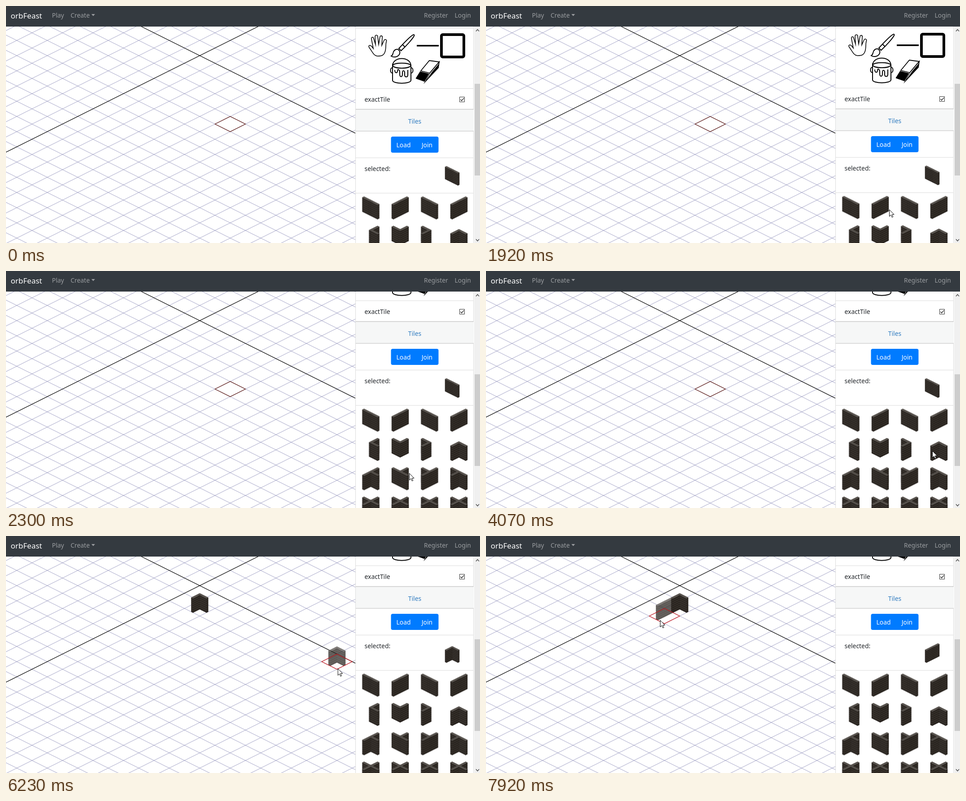
Write an HTML page with a canvas that moves like this. It is 1057 px wide and 530 px high and loops after 8000 ms.

```html
<!DOCTYPE html>
<html lang="en">
<head>
<meta charset="utf-8">
<title>Isometric tile editor</title>
<style>
html, body { margin: 0; width: 100%; height: 100%; overflow: hidden; background: #fff; }
canvas { display: block; }
</style>
</head>
<body>
<canvas id="stage" width="1057" height="530"></canvas>
<script>
const ctx = document.getElementById('stage').getContext('2d');
const LOOP = 8000, STEP = 76.8;
const OX = 432, OY = 111, HW = 34, HH = 17;   // grid origin and half cell

// ---- wall sprites, built from isometric boxes ----
const BOXES = {
  nw: [-17, -2, -2, 2], ne: [-2, 2, -17, -2], mid: [-2, 2, -2, 2],
  se: [2, 17, -2, 2], sw: [-2, 2, 2, 17]
};
const WALL = 32, LOGS = 7;

function makeWall(arms) {
  const cv = document.createElement('canvas');
  cv.width = 42;
  cv.height = 56;
  const g = cv.getContext('2d');
  g.translate(21, 44);
  const pt = (u, v, h) => [u - v, (u + v) / 2 - h];
  const poly = (color, pts) => {
    g.beginPath();
    pts.forEach(p => g.lineTo(...p));
    g.closePath();
    g.fillStyle = g.strokeStyle = color;
    g.lineWidth = 0.4;
    g.fill();
    g.stroke();
  };
  const face = (a, b, color, groove) => {
    poly(color, [pt(...a, 0), pt(...b, 0), pt(...b, WALL), pt(...a, WALL)]);
    g.strokeStyle = groove;
    g.lineWidth = 0.8;
    for (let k = 1; k < LOGS; k++) {
      g.beginPath();
      g.moveTo(...pt(...a, k * WALL / LOGS));
      g.lineTo(...pt(...b, k * WALL / LOGS));
      g.stroke();
    }
  };
  for (const name of ['nw', 'ne', 'mid', 'se', 'sw']) {
    if (name !== 'mid' && !arms.includes(name)) continue;
    const [u0, u1, v0, v1] = BOXES[name];
    face([u0, v1], [u1, v1], '#2d2824', '#4a443e');
    face([u1, v0], [u1, v1], '#29241f', '#47403a');
    poly('#56514c', [pt(u0, v0, WALL), pt(u1, v0, WALL), pt(u1, v1, WALL), pt(u0, v1, WALL)]);
  }
  return cv;
}

const back = makeWall('nw se'), slash = makeWall('ne sw'), roof = makeWall('sw se');
const cross = makeWall('nw ne sw se');
const palette = [
  back, slash, back, slash,
  makeWall('ne se'), makeWall('nw ne'), makeWall('nw sw'), roof,
  makeWall('sw se ne'), makeWall('nw se ne'), makeWall('ne sw nw'), makeWall('nw se sw'),
  cross, cross, cross, cross
];

function putWall(wall, x, y, scale = 1) {
  ctx.drawImage(wall, x - 21 * scale, y - 44 * scale, 42 * scale, 56 * scale);
}

// ---- drawing helpers ----
function rect(x, y, w, h, color) {
  ctx.fillStyle = color;
  ctx.fillRect(x, y, w, h);
}

function text(str, x, y, color, size = 13.9, align = 'left') {
  ctx.font = size + 'px "Noto Sans", "Open Sans", sans-serif';
  ctx.textAlign = align;
  ctx.fillStyle = color;
  ctx.fillText(str, x, y);
}

function shape(d, stroke, width, fill) {
  const p = new Path2D(d);
  if (fill) { ctx.fillStyle = fill; ctx.fill(p); }
  if (stroke) { ctx.strokeStyle = stroke; ctx.lineWidth = width; ctx.stroke(p); }
}

function clipTo(x, y, w, h, draw) {
  ctx.save();
  ctx.beginPath();
  ctx.rect(x, y, w, h);
  ctx.clip();
  draw();
  ctx.restore();
}

// ---- pointer path: time, x, y ----
const PATH = [
  [0, 952, 536], [80, 946, 518], [400, 905, 458], [600, 880, 434], [830, 866, 441],
  [1140, 825, 442], [1229, 825, 442], [1370, 889, 439], [1460, 889, 439],
  [1750, 899, 455], [1920, 899, 455], [2304, 899, 452], [2610, 898, 447],
  [2842, 898, 447], [3072, 800, 391], [3230, 897, 447], [3456, 897, 447],
  [4070, 995, 402], [4531, 995, 402], [5299, 442, 172], [5376, 442, 172],
  [5450, 438, 164], [5914, 438, 164], [6390, 906, 369], [6460, 906, 369],
  [6770, 872, 341], [6912, 872, 341], [7219, 764, 329], [7680, 366, 196],
  [7775, 366, 196], [7910, 388, 188], [8000, 388, 188]
];

function pointer(t) {
  const n = Math.max(1, PATH.findIndex(k => k[0] >= t));
  const [t0, x0, y0] = PATH[n - 1], [t1, x1, y1] = PATH[n];
  const p = (t - t0) / (t1 - t0);
  return [x0 + (x1 - x0) * p, y0 + (y1 - y0) * p];
}

const onMap = ([x, y]) => x < 779 && y > 46;

// Centre of the last cell the pointer touched
function hoverCell(t) {
  for (let q = t; q >= 0; q -= STEP) {
    const p = pointer(q);
    if (!onMap(p)) continue;
    const a = (p[0] - OX) / HW, b = (p[1] - OY) / HH;
    const i = Math.floor((a + b) / 2), j = Math.floor((b - a) / 2);
    return [OX + (i - j) * HW, OY + (i + j + 1) * HH];
  }
  return [500, 264];
}

// ---- scene parts ----
function gridLine(n, color, width) {
  ctx.strokeStyle = color;
  ctx.lineWidth = width;
  for (const slope of [0.5, -0.5]) {
    ctx.beginPath();
    ctx.moveTo(0, OY + n * HH * 2 - OX * slope);
    ctx.lineTo(779, OY + n * HH * 2 + (779 - OX) * slope);
    ctx.stroke();
  }
}

function drawMap(t, selected) {
  for (let n = -10; n < 22; n++) if (n) gridLine(n, '#a3a3c6', 1);
  gridLine(0, '#000', 1.2);
  if (t >= 5750) putWall(roof, 432, 162);
  const [x, y] = hoverCell(t), live = onMap(pointer(t));
  if (live) {
    ctx.globalAlpha = 0.75;
    putWall(selected, x, y);
    ctx.globalAlpha = 1;
  }
  shape(`M${x - HW} ${y}L${x} ${y - HH}L${x + HW} ${y}L${x} ${y + HH}Z`, live ? '#c4161c' : '#5e1a14', 1.2);
}

function drawTools() {
  const ink = '#000';
  // hand
  shape('M828 112C820 111 818 104 810 93C807 88 812 86 816 91L819 95L815 74C814 69 819 68 820 73L824 86L823 69C823 64 829 64 829 69L831 86L834 69C835 65 840 66 839 71L838 88L843 77C845 73 850 75 848 80C846 88 848 95 845 103C842 111 837 112 828 112Z', ink, 1.6);
  // brush
  shape('M909 64C904 65 888 82 876 95L881 100C893 89 907 73 910 67C911 65 910 64 909 64ZM884 86L890 92M874 97C868 96 864 100 863 106C862 110 861 111 859 112C865 116 876 114 878 106C879 103 878 100 874 97Z', ink, 2);
  rect(916, 87, 49, 3.5, ink);
  ctx.strokeStyle = ink;
  ctx.lineWidth = 6;
  ctx.beginPath();
  ctx.roundRect(971, 64, 50, 50, 3);
  ctx.stroke();
  // bucket
  shape('M862 134C862 112 903 112 903 134M862 133C866 126 899 126 903 133C899 141 866 141 862 133V166C862 175 903 175 903 166V133M862 138C856 138 856 150 862 150M903 138C909 138 909 150 903 150M867 143c0 8 6 8 6 2s5-2 5 3v4c0 8 6 8 6 0v-3c0-6 5-5 5 0v5c0 6 7 6 7 0v-11', ink, 2);
  // eraser
  shape('M925 145L944 122L966 125L945 150Z', ink, 1.8, '#fff');
  shape('M945 150L966 125L964 138L935 169Z', ink, 1.8, '#fff');
  shape('M924 146L944 151L934 169L914 162ZM950 148L965 130L964 138L941 162Z', ink, 1, ink);
  shape('M924 146L944 151L934 169', '#fff', 0.8);
}

function drawPanel(scroll, selected) {
  const rule = (y, h = 1, color = '#dcdcdc') => rect(780, y, 263, h, color);
  rect(779, 46, 278, 484, '#fff');
  rect(779, 46, 1, 484, '#dcdcdc');
  rect(1042, 46, 1, 484, '#dcdcdc');
  ctx.save();
  ctx.translate(0, -scroll);
  rule(49);
  drawTools();
  rule(184);
  text('exactTile', 799.5, 214, '#212529');
  shape('M1011.5 203.5h11v11h-11Z', '#333', 1);
  shape('M1013.5 209l2.5 3l5-6', '#222', 1.3);
  rule(230, 2, '#d6d6d6');
  rule(232, 47, '#f6f7f7');
  rule(279, 1.5, '#d2d2d2');
  text('Tiles', 911.5, 263, '#2f7bc0', 13.9, 'center');
  ctx.fillStyle = '#007bff';
  ctx.beginPath();
  ctx.roundRect(858.5, 292, 106, 36, 4);
  ctx.fill();
  text('Load', 886.5, 316, '#fff', 13.9, 'center');
  text('Join', 939, 316, '#fff', 13.9, 'center');
  rule(339);
  text('selected:', 799.5, 369, '#212529');
  putWall(selected, 995, 393.3, 0.85);
  rule(418);
  palette.forEach((wall, n) => putWall(wall, 813.5 + n % 4 * 65.5, 467.5 + (n >> 2) * 65.5));
  ctx.restore();

  rect(1044, 46, 13, 484, '#f0f0f0');
  rect(1045, 174 + Math.round(scroll * 0.483), 12, 205, '#cdcdcd');
  shape('M1048 56.5l3.5 -4l3.5 4M1048 521.5l3.5 4l3.5 -4', '#555', 1.6);
}

function drawNav() {
  const link = 'rgba(255,255,255,.5)';
  rect(0, 0, 1057, 46, '#343a40');
  text('orbFeast', 10.5, 27.5, '#fff', 17);
  text('Play', 102.5, 26, link);
  text('Create', 144, 26, link);
  shape('M190.5 18h8l-4 4.5Z', null, 0, link);
  text('Register', 932, 26, link);
  text('Login', 1000.5, 26, link);
}

function drawPointer([x, y]) {
  ctx.save();
  ctx.translate(x, y);
  shape('M.5 .5V15.5L4 12.2L6.3 17.6L8.7 16.6L6.4 11.3H11Z', '#000', 1, '#fff');
  ctx.restore();
}

function render(now) {
  const t = Math.floor((now % LOOP) / STEP + 0.22) * STEP;
  const p = Math.min(1, Math.max(0, (t - 1895) / 405));
  const scroll = Math.round(118 * p * p * (3 - 2 * p));
  const selected = t < 4290 ? back : t < 6905 ? roof : slash;
  rect(0, 0, 1057, 530, '#fff');
  clipTo(0, 46, 779, 484, () => drawMap(t, selected));
  clipTo(779, 46, 278, 484, () => drawPanel(scroll, selected));
  drawNav();
  drawPointer(pointer(Math.min(t, LOOP)));
}

const start = performance.now();
function tick() {
  render(performance.now() - start);
  requestAnimationFrame(tick);
}
tick();
</script>
</body>
</html>
```
